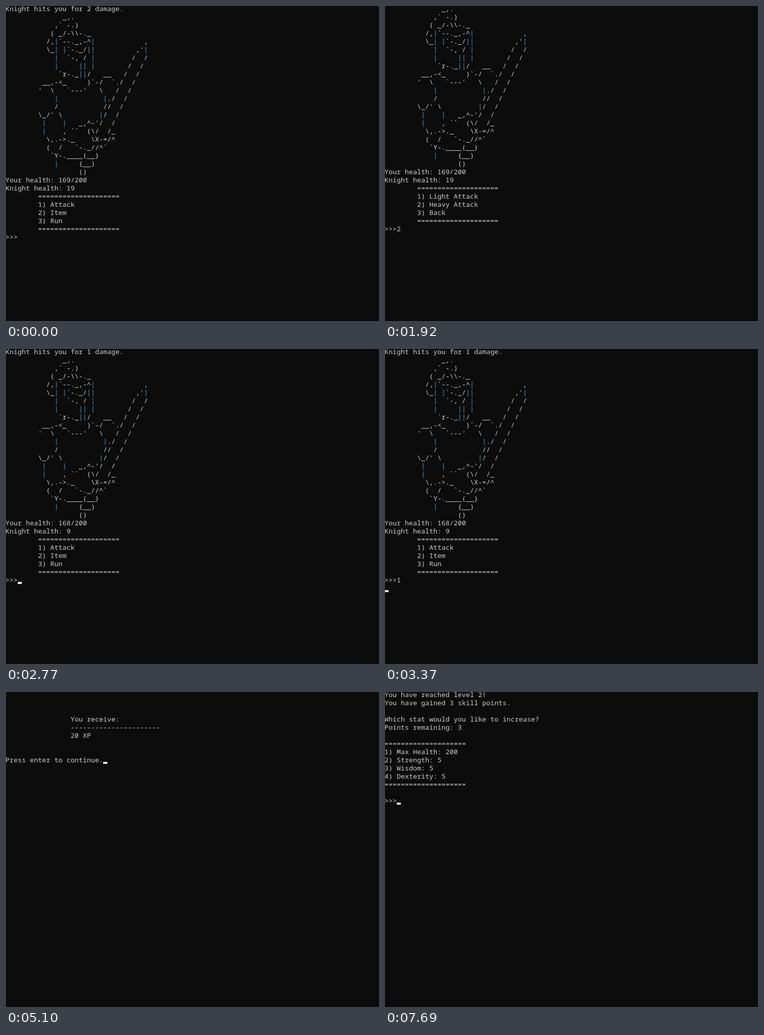
Write an HTML page that moves like this. It is 733 px wide and 618 px high and loops after 8 s.

```html
<!DOCTYPE html>
<html lang="en">
<head>
<meta charset="utf-8">
<title>Console battle</title>
<style>
  html, body {
    margin: 0;
    width: 100%;
    height: 100%;
    overflow: hidden;
    background: #0c0c0c;
  }
  #screen {
    position: absolute;
    left: -1px;
    top: -3px;
    margin: 0;
    color: #ccc;
    font: 13.3333px/16px "Noto Sans Mono", "DejaVu Sans Mono", monospace;
    font-kerning: none;
    font-variant-ligatures: none;
    white-space: pre;
  }
  #screen i {
    font-style: normal;
    color: #559fd6;
  }
  #cursor {
    position: absolute;
    left: -1px;
    top: 9px;
    width: 8px;
    height: 4px;
    background: #f2f2f2;
  }
</style>
</head>
<body>
<pre id="knight" hidden>
              _,.
            ,` -.)
           ( _/-\\-._
          /,|`--._,-^|            ,
          \_| |`-._/||          ,'|
            |  `-, / |         /  /
            |     || |        /  /
             `r-._||/   __   /  /
         __,-&lt;_     )`-/  `./  /
        '  \   `---'   \   /  /
            |           |./  /
            /           //  /
        \_/' \         |/  /
         |    |   _,^-'/  /
         |    , ``  (\/  /_
          \,.-&gt;._    \X-=/^
          (  /   `-._//^`
           `Y-.____(__}
            |     {__)
                  ()</pre>
<pre id="screen"></pre>
<div id="cursor"></div>
<script>
  const LOOP = 8000;
  const $ = id => document.getElementById(id);
  const knight = $('knight').textContent.replace(/^\n/, '');
  const rule = '='.repeat(20);
  const more = 'Press enter to continue.';

  const lines = (...rows) => rows.join('\n');
  const indent = (n, ...rows) => rows.map(r => ' '.repeat(n) + r).join('\n');

  const fight = (you, foe, ...options) => lines(
    knight,
    `Your health: ${you}/200`,
    `Knight health: ${foe}`,
    indent(8, rule, ...options.map((o, i) => `${i + 1}) ${o}`), rule),
    '>>>');
  const mainMenu = (hit, you, foe) =>
    lines(`Knight hits you for ${hit} damage.`, fight(you, foe, 'Attack', 'Item', 'Run'));
  const attackMenu = (you, foe) => fight(you, foe, 'Light Attack', 'Heavy Attack', 'Back');
  const strike = (menu, dmg) => lines(menu + '2', `You hit for ${dmg} damage.`, '', '', more);

  const main1 = mainMenu(2, 169, 19), attack1 = attackMenu(169, 19);
  const main2 = mainMenu(1, 168, 9), attack2 = attackMenu(168, 9);
  const reward = lines('', '', '',
    indent(16, 'You receive:', '-'.repeat(22), '20 XP'), '', '', more);
  const levelUp = lines(
    'You have reached level 2!', 'You have gained 3 skill points.', '',
    'Which stat would you like to increase?', 'Points remaining: 3', '',
    rule, '1) Max Health: 200', '2) Strength: 5', '3) Wisdom: 5', '4) Dexterity: 5', rule,
    '', '>>>');

  // [start ms, text, cursor]: 'end' = after the text, 'next' = start of the next row, '' = off
  const steps = [
    [0, main1, ''],
    [860, main1, 'end'],
    [920, main1 + '1', 'end'],
    [1260, main1 + '1', 'next'],
    [1320, attack1, 'end'],
    [1650, attack1 + '2', 'end'],
    [1920, attack1 + '2', ''],
    [2110, strike(attack1, 10), 'end'],
    [2710, strike(attack1, 10), 'next'],
    [2770, main2, 'end'],
    [3100, main2 + '1', 'end'],
    [3370, main2 + '1', 'next'],
    [3440, attack2, 'end'],
    [3640, attack2 + '2', 'end'],
    [3970, attack2 + '2', 'next'],
    [4040, strike(attack2, 14), 'end'],
    [5040, '', ''],
    [5100, reward, 'end'],
    [6100, reward, 'next'],
    [6160, '', ''],
    [6230, levelUp, 'end'],
    [7160, levelUp, ''],
    [7690, levelUp, 'end']
  ];

  const toHtml = s => s.replace(/</g, '&lt;').replace(/\|/g, '<i>|</i>');

  let shown = null;
  function show(step) {
    if (step === shown) return;
    shown = step;
    const [, text, mode] = step;
    $('screen').innerHTML = toHtml(text);
    const rows = (mode === 'next' ? text + '\n' : text).split('\n');
    const row = rows.length - 1, col = rows[row].length;
    $('cursor').style.transform = `translate(${col * 8}px, ${row * 16}px)`;
    $('cursor').style.visibility = mode ? 'visible' : 'hidden';
  }

  const start = performance.now();
  function tick() {
    const t = (performance.now() - start) % LOOP;
    show(steps.findLast(s => s[0] <= t) || steps[0]);
    requestAnimationFrame(tick);
  }
  tick();
</script>
</body>
</html>
```
